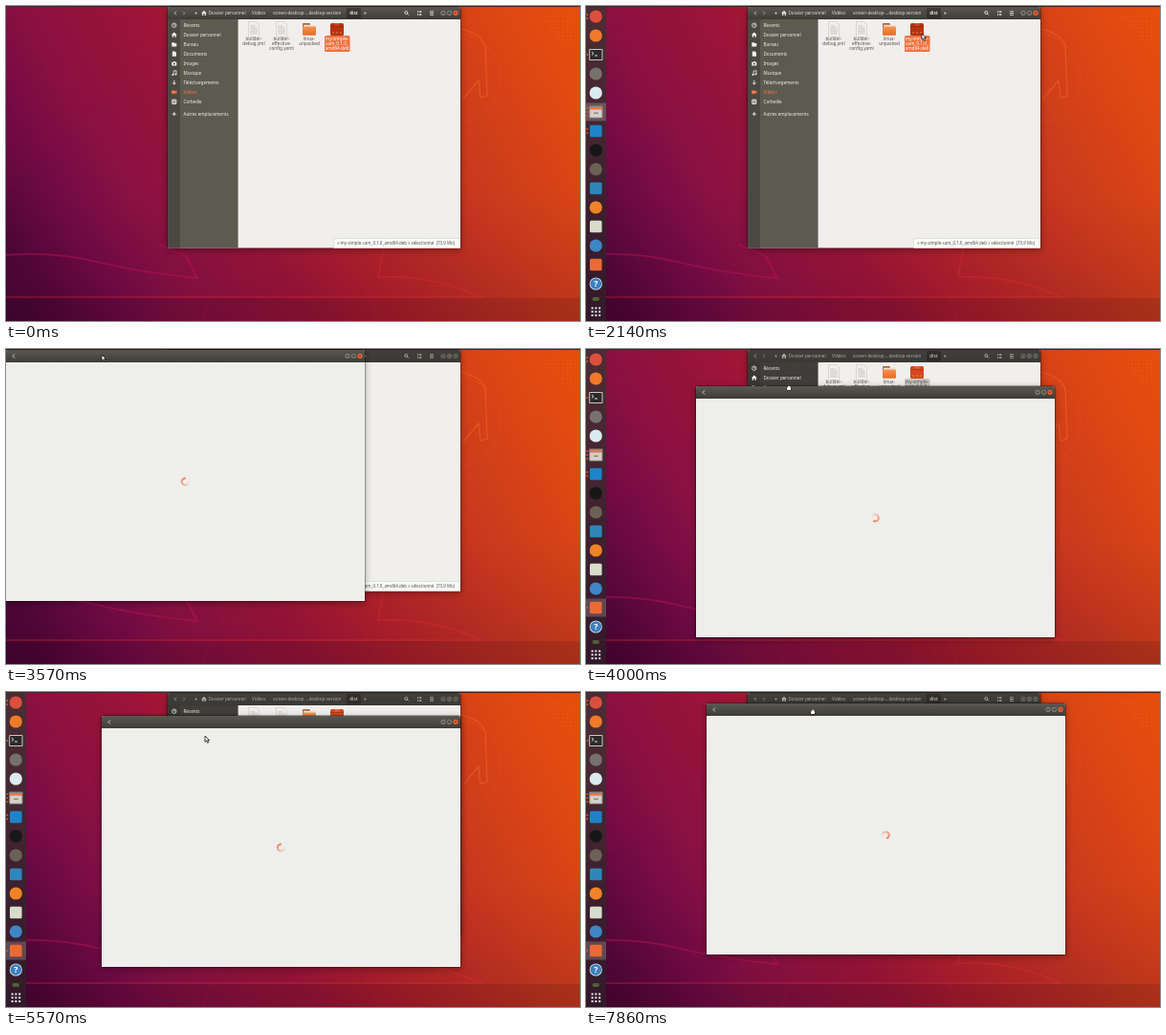
An HTML page with a canvas for the animation above (8000 ms loop, 600 px wide and 330 px high).

```html
<!DOCTYPE html>
<html lang="fr">
<head>
<meta charset="utf-8">
<title>Desktop</title>
<style>
html, body { margin: 0; width: 600px; height: 330px; overflow: hidden; background: #3a0530; }
canvas { display: block; }
</style>
</head>
<body>
<canvas id="stage" width="600" height="330"></canvas>
<script>
const ctx = document.getElementById('stage').getContext('2d');
const LOOP = 8000, STEPS = 56, TAU = Math.PI * 2;
const FONT = '"Noto Sans", "Open Sans", sans-serif';

// Position along [time, x, y] points, eased between neighbours.
function track(t, points) {
  if (t <= points[0][0]) return points[0].slice(1);
  for (let i = 1; i < points.length; i++) {
    const [t0, ...a] = points[i - 1], [t1, ...b] = points[i];
    if (t <= t1) {
      const k = (t - t0) / (t1 - t0), e = k * k * (3 - 2 * k);
      return a.map((v, n) => v + (b[n] - v) * e);
    }
  }
  return points[points.length - 1].slice(1);
}

function rect(x, y, w, h, color) {
  ctx.fillStyle = color;
  ctx.fillRect(x, y, w, h);
}
function round(x, y, w, h, r, color) {
  ctx.fillStyle = color;
  ctx.beginPath();
  ctx.roundRect(x, y, w, h, r);
  ctx.fill();
}
function disc(x, y, r, color) {
  ctx.fillStyle = color;
  ctx.beginPath();
  ctx.arc(x, y, r, 0, TAU);
  ctx.fill();
}
function ring(x, y, r, color, width = 0.8) {
  ctx.strokeStyle = color;
  ctx.lineWidth = width;
  ctx.beginPath();
  ctx.arc(x, y, r, 0, TAU);
  ctx.stroke();
}
function trace(path, color, width = 1) {
  ctx.strokeStyle = color;
  ctx.lineWidth = width;
  ctx.stroke(new Path2D(path));
}
function shape(path, color) {
  ctx.fillStyle = color;
  ctx.fill(new Path2D(path));
}
function text(str, x, y, color, align = 'left', size = 4.6, weight = 400) {
  ctx.font = `${weight} ${size}px ${FONT}`;
  ctx.textAlign = align;
  ctx.textBaseline = 'middle';
  ctx.fillStyle = color;
  ctx.fillText(str, x, y);
}
function gradient(x0, y0, x1, y1, ...stops) {
  const g = ctx.createLinearGradient(x0, y0, x1, y1);
  stops.forEach(([at, color]) => g.addColorStop(at, color));
  return g;
}
function at(x, y, draw) {
  ctx.save();
  ctx.translate(x, y);
  draw();
  ctx.restore();
}

// Window body with a soft shadow and a thin dark outline.
function windowBody(width, height, color) {
  ctx.save();
  ctx.shadowColor = 'rgba(0,0,0,.6)';
  ctx.shadowBlur = 7;
  ctx.shadowOffsetY = 2;
  round(-0.5, -0.5, width + 1, height + 1, [2, 2, 0, 0], 'rgba(0,0,0,.55)');
  ctx.restore();
  round(0, 0, width, height, [2, 2, 0, 0], color);
}

function wallpaper() {
  rect(0, 0, 600, 330, gradient(0, 330, 600, 0,
    [0, '#440534'], [0.06, '#500638'], [0.165, '#720a47'], [0.25, '#881043'], [0.41, '#9c1438'],
    [0.54, '#b3212b'], [0.74, '#cb3a1d'], [0.93, '#e24b10'], [1, '#e64e0d']));
  rect(0, 200, 600, 130, gradient(0, 200, 0, 330, [0, 'rgba(40,0,25,0)'], [1, 'rgba(40,0,25,.12)']));
  shape('M0 195 L170 30 V0 H0Z', 'rgba(170,25,45,.06)');
  rect(0, 306, 600, 24, 'rgba(30,0,15,.12)');

  trace('M0 261 Q50 257 95 268 T200 285 L188 262 L160 250', 'rgba(190,20,85,.48)', 1.8);
  trace('M395 250 L389 284 Q445 281 497 305 H0', 'rgba(225,45,50,.38)', 1.5);
  trace('M475 24 Q497 29 501 42 L503 94 L496 96 L494 78 L478 97', 'rgba(255,125,50,.36)', 1.2);
  ctx.setLineDash([1, 1]);
  ring(470, 76, 47, 'rgba(255,140,60,.25)');
  ring(297, 345, 92, 'rgba(225,50,55,.3)');
  ctx.setLineDash([]);
  for (let row = 0; row < 7; row++) {
    for (let col = 0; col < 10; col++) {
      if (col >= row) rect(558 + col * 4, 11 + row * 4, 1, 1, 'rgba(255,150,60,.22)');
      if (col <= row + 1) rect(4 + col * 4, 278 + row * 4, 1, 1, 'rgba(180,20,90,.25)');
    }
  }
  rect(0, 0, 600, 1, '#42242b');
}

function titleBar(width, focused) {
  const [top, bottom] = focused ? ['#5a5851', '#3d3c37'] : ['#403f3a', '#3a3935'];
  round(0, 0, width, 13, [2, 2, 0, 0], gradient(0, 0, 0, 13, [0, top], [1, bottom]));
  [18, 11.5, 5].forEach((right, i) => {
    const x = width - right, active = focused && i === 2;
    disc(x, 6.3, 2.6, active ? '#ed6337' : focused ? '#85827a' : '#6c6a64');
    disc(x, 6.3, 1.8, active ? '#e8592d' : focused ? '#68665f' : '#494842');
    const mark = active ? '#6b2610' : focused ? '#35342f' : '#85837c';
    if (i === 0) rect(x - 1, 6.3, 2, 0.7, mark);
    if (i === 1) trace(`M${x - 0.8} 5.5 h1.6 v1.6 h-1.6Z`, mark, 0.5);
    if (i === 2) trace(`M${x - 0.9} 5.4 l1.8 1.8 m0 -1.8 l-1.8 1.8`, mark, 0.6);
  });
}

const chevron = (x, y, dir, color, size = 1.8) =>
  trace(`M${x - dir * size / 2} ${y - size} l${dir * size} ${size} l${-dir * size} ${size}`, color, 0.9);

// Small pictograms of the side bar, drawn around 0,0.
const homeIcon = color => {
  shape('M-3 0 L0 -2.7 L3 0 H2 V2.5 H.7 V.8 H-.7 V2.5 H-2 V0Z', color);
};
const places = [
  ['Récents', c => { ring(0, 0, 2.2, c); trace('M0 -1.4 V0 H1.2', c, 0.7); }],
  ['Dossier personnel', homeIcon],
  ['Bureau', c => shape('M-2.5 -2 H0 L.8 -1.2 H2.5 V2.4 H-2.5Z', c)],
  ['Documents', c => shape('M-2 -2.6 H1 L2.2 -1.3 V2.6 H-2Z', c)],
  ['Images', c => { shape('M-2.5 -1.5 H-1 L-.6 -2.3 H.8 L1.2 -1.5 H2.5 V2.2 H-2.5Z', c); disc(0, 0.4, 1, '#4c4943'); }],
  ['Musique', c => { disc(-1.4, 1.8, 1, c); disc(1.6, 1.3, 1, c); trace('M-.7 1.8 V-2 L2.2 -2.5 V1.2', c, 0.8); }],
  ['Téléchargements', c => trace('M0 -2.4 V1.8 M-1.8 .2 L0 2 L1.8 .2', c, 0.9)],
  ['Vidéos', c => shape('M-2.7 -1.8 H1 V-.8 L2.7 -1.6 V1.6 L1 .8 V1.8 H-2.7Z', c)],
  ['Corbeille', c => { trace('M-2 -2 H2 V2.3 H-2Z', c, 1); trace('M-2 0 H2 M0 -2 V2', c, 0.7); }],
  ['Autres emplacements', c => trace('M-2 0 H2 M0 -2 V2', c, 0.9)],
];

function documentIcon() {
  shape('M-6 -8 H3 L6 -5 V8 H-6Z', '#c9c8c5');
  shape('M-5.4 -7.4 H2.8 L5.4 -4.8 V7.4 H-5.4Z', '#f0efed');
  for (let y = -4; y < 6; y += 2) rect(-3.8, y, y < -3 ? 5 : 7.6, 0.8, '#c0bfbb');
}
function folderIcon() {
  round(-7, -6.5, 8, 5, 1, '#a5633f');
  rect(-6, -4.8, 12.5, 3, '#f2dccd');
  round(-7, -3, 14, 9.2, 1, gradient(0, -3, 0, 6, [0, '#f59551'], [1, '#ea6a26']));
}
function packageIcon(focused) {
  round(-7, -6.5, 14, 13, 1.5, focused ? '#b83411' : '#d5491d');
  rect(-7, -3.2, 14, 0.8, focused ? '#902508' : '#a83511');
  rect(-2.5, -6.5, 5, 2.5, focused ? '#cc4c28' : '#e2673c');
  [-4, 0, 4].forEach(x => rect(x - 0.7, 3, 1.4, 1, '#ef9b72'));
}

const files = [
  [259, documentIcon, ['builder-', 'debug.yml']],
  [288, documentIcon, ['builder-', 'effective-', 'config.yaml']],
  [317, folderIcon, ['linux-', 'unpacked']],
  [346, packageIcon, ['my-simple-', 'cam_0.1.0_', 'amd64.deb']],
];

function fileManager(focused) {
  at(169, 1, () => {
    windowBody(306, 252.5, '#f0efed');
    titleBar(306, focused);
  });
  const ink = focused ? '#dfdbd2' : '#aaa79f';
  chevron(177, 7.5, -1, ink);
  chevron(186, 7.5, 1, focused ? '#b0ada5' : '#88867f');
  round(356, 2, 15, 11, 1, 'rgba(25,24,22,.4)');
  shape('M199.2 5.9 V9.1 L197.2 7.5Z', ink);
  at(207, 7.5, () => homeIcon(ink));
  text('Dossier personnel', 211.5, 7.6, ink);
  text('Vidéos', 257, 7.6, ink);
  text('screen-desktop-…desktop-version', 279, 7.6, ink, 'left', 4.5);
  text('dist', 363.5, 7.6, ink, 'center', 4.6, 700);
  shape('M374.7 5.9 V9.1 L376.7 7.5Z', ink);
  ring(418.3, 6.9, 1.5, ink, 1);
  trace('M419.4 8 l1.5 1.5', ink, 1);
  trace('M430 6 h1.2 M430 9 h1.2 M432 6 h2.3 M432 9 h2.3', ink, 1.3);
  trace('M443 5.7 h4 M443 7.5 h4 M443 9.3 h4', ink, 0.9);

  rect(169, 14, 73.6, 239.5, focused ? '#5d5a50' : '#3f3e3a');
  rect(169, 14, 13, 239.5, focused ? '#4c4943' : '#393834');
  places.forEach(([label, icon], i) => {
    const y = i === 9 ? 113.2 : 20.2 + i * 10;
    const color = label === 'Vidéos' ? '#f07746' : '#f2f0ea';
    at(175.8, y, () => icon(color));
    text(label, 185.5, y + 0.1, color);
  });

  files.forEach(([x, icon, lines], i) => {
    const selected = i === 3;
    if (selected) round(333, 31, 26.5, 17, 1.5, focused ? '#ef7240' : '#c9c6c0');
    at(x, 24.5, () => icon(focused));
    lines.forEach((line, n) =>
      text(line, x, 34.3 + n * 5, selected && focused ? '#fff' : '#55534e', 'center', 4.7));
  });

  round(342, 243.5, 133, 10, [2, 0, 0, 0], '#d4d3cf');
  round(342.6, 244.1, 132.4, 9.4, [2, 0, 0, 0], '#f9f9f8');
  text('« my-simple-cam_0.1.0_amd64.deb » sélectionné  (73,9 Mo)', 469, 248.8, '#55534e', 'right', 4.45);
}

function spinner(x, y, t) {
  const gap = TAU * (t / 1000 - 0.55), parts = 18, arc = 5 / parts;
  ctx.lineWidth = 2;
  for (let i = 0; i < parts; i++) {
    const start = gap + 0.6 + i * arc;
    ctx.strokeStyle = `rgba(232,98,42,${0.05 + 0.9 * i / parts})`;
    ctx.beginPath();
    ctx.arc(x, y, 3.5, start, start + arc);
    ctx.stroke();
  }
}

function appWindow(t, x, y) {
  const [scale, opacity] = track(t, [[2100, 0.85, 0], [2290, 1, 1]]);
  const focused = t > 2700;
  ctx.save();
  ctx.globalAlpha = opacity;
  ctx.translate(x + 187.5, y + 131.5);
  ctx.scale(scale, scale);
  ctx.translate(-187.5, -131.5);
  windowBody(375, 263, '#eeeeec');
  titleBar(375, focused);
  chevron(8, 6.5, -1, '#e4e1d9', 2);
  if (focused) spinner(187.3, 138, t);
  ctx.restore();
}

// Launchers: centre, form, main colour.
const launchers = [
  [11, 'disc', '#dd4f3c'], [31, 'disc', '#f17a28'], [51, 'terminal'],
  [71, 'disc', '#77716d'], [91, 'disc', '#dcebf0'], [111, 'cabinet'],
  [131, 'square', '#1f83c9'], [151, 'disc', '#171717'], [171, 'disc', '#6b6156'],
  [191, 'square', '#2f86bb'], [211, 'disc', '#f08326'], [231, 'square', '#d7dccb'],
  [251, 'disc', '#3f86c6'], [271, 'square', '#ea6a35'], [291, 'help'], [307, 'small'],
];

function launcher(y, form, color) {
  if (form === 'disc') disc(10.3, y, 6.6, color);
  if (form === 'square') round(4, y - 6.3, 12.6, 12.6, 1.5, color);
  if (form === 'small') round(6.5, y - 2, 7.5, 4, 2, '#4d6136');
  if (form === 'terminal') {
    round(3.2, y - 6, 14.3, 12, 1, '#c9c7c2');
    rect(4.2, y - 5, 12.3, 10, '#2d2a2c');
    trace(`M6 ${y - 3} l2 1.7 l-2 1.7 M9 ${y + 1} h3`, '#f2f2f2', 0.9);
  }
  if (form === 'cabinet') {
    round(3.2, y - 6.5, 14.3, 13, 1, '#8b8780');
    rect(4.2, y - 5, 12.3, 2.5, '#e8764a');
    rect(4.2, y - 2.5, 12.3, 8.2, '#d5d0c8');
    rect(8, y + 0.5, 4.8, 1.4, '#8a857d');
  }
  if (form === 'help') {
    disc(10.3, y, 6.6, '#cfe0ef');
    disc(10.3, y, 5.8, '#3d7fbd');
    text('?', 10.3, y + 0.2, '#fff', 'center', 9, 700);
  }
}

function dock(x, appOpen) {
  at(x, 0, () => {
    rect(0, 1, 21, 329, gradient(0, 0, 0, 330, [0, 'rgba(68,50,50,.87)'], [1, 'rgba(48,28,40,.85)']));
    rect(0, appOpen ? 261.5 : 101.5, 21, 19, 'rgba(255,255,255,.2)');
    launchers.forEach(item => launcher(...item));
    const dots = (y, n) => {
      for (let i = 0; i < n; i++) disc(1.4, y + (i - (n - 1) / 2) * 4, 0.9, '#e2542a');
    };
    dots(11, 2);
    dots(51, 1);
    dots(111, 3);
    dots(131, 2);
    if (appOpen) dots(271, 1);
    for (let i = 0; i < 9; i++) rect(5.6 + i % 3 * 3.8, 315.5 + Math.floor(i / 3) * 3.8, 2, 2, '#eee');
  });
}

function cursor(x, y, grabbing) {
  at(x, y, () => {
    if (grabbing) {
      round(-2.6, -1.6, 5.4, 4.2, 1.5, '#222');
      round(-2, -1, 4.2, 3, 1, '#fff');
      round(-0.9, -2.2, 2.3, 2, 0.8, '#fff');
    } else {
      const arrow = 'M0 0 V6.2 L1.5 4.9 L2.6 7.3 L3.7 6.8 L2.7 4.5 H4.6Z';
      shape(arrow, '#fff');
      trace(arrow, '#111', 0.8);
    }
  });
}

const windowPath = [[3570, 0, 1], [4000, 115, 39], [4430, 116, 37], [5140, 100, 25], [7000, 100, 25], [7860, 126, 12]];
const cursorPath = [
  [860, 334, 58], [1200, 351, 29], [2140, 351, 29], [2570, 286, 98], [2800, 286, 98], [3430, 100, 6],
  [3570, 100, 6], [4000, 212, 41], [4430, 213, 39], [5140, 198, 29], [5430, 208, 46],
  [6200, 208, 46], [6860, 211, 34], [7000, 211, 34], [7860, 237, 21],
];
const dockPath = [[140, -22], [430, 0], [2140, 0], [2430, -22], [3700, -22], [3990, 0]];

function draw(now) {
  const step = Math.floor(now % LOOP / LOOP * STEPS + 0.001);
  const t = step * LOOP / STEPS;
  const appOpen = t > 2100;
  wallpaper();
  fileManager(!appOpen);
  if (appOpen) appWindow(t, ...track(t, windowPath));
  dock(track(t, dockPath)[0], appOpen);
  const grabbing = (t > 3600 && t < 5140) || t > 6990;
  if (t > 850) cursor(...track(t, cursorPath), grabbing);
}

const began = performance.now();
function tick() {
  draw(performance.now() - began);
  requestAnimationFrame(tick);
}
tick();
</script>
</body>
</html>
```
